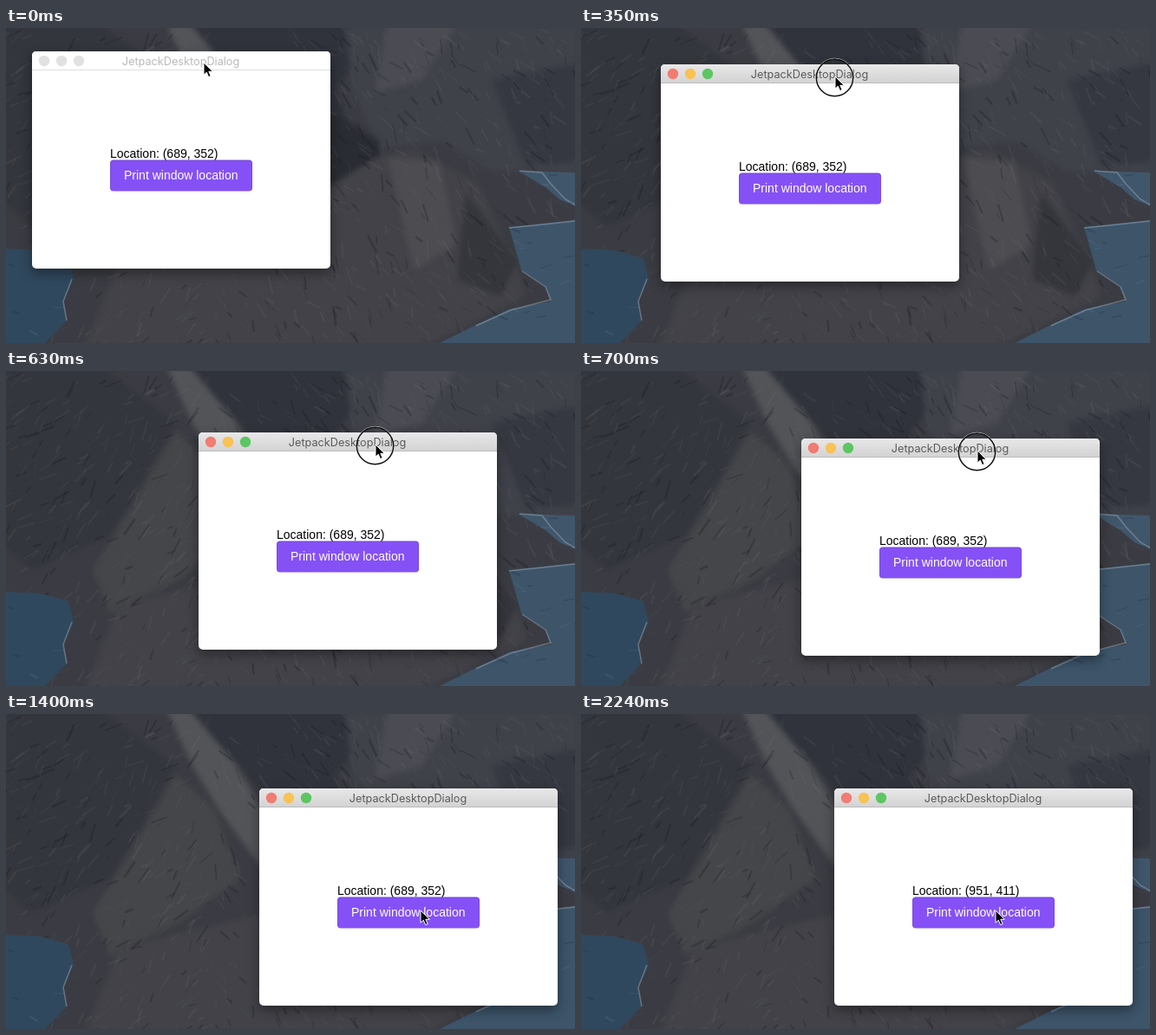
Write an HTML page with a canvas that moves like this. It is 656 by 364 pixels and loops after 2.31 s.

```html
<!DOCTYPE html>
<html lang="en">
<head>
<meta charset="utf-8">
<title>Window location</title>
<style>
  html, body { margin: 0; width: 100%; height: 100%; overflow: hidden; background: #3a3c43; }
  canvas, svg { position: absolute; left: 0; top: 0; width: 656px; height: 364px; }
  text { font: 14px "Liberation Sans", Arial, sans-serif; }
  #title { font: 12.7px Inter, Roboto, sans-serif; text-anchor: middle; fill: #5c5b5c; }
  #win { filter: drop-shadow(0 5px 7px rgba(0, 0, 0, .4)); }
  .idle .light { fill: #e1e1e1; }
  .idle #title { fill: #b9b9b9; }
  .idle #bar { fill: #fff; }
  .idle #rule { stroke: #dedede; }
</style>
</head>
<body>
<canvas id="scene" width="656" height="364"></canvas>
<svg viewBox="0 0 656 364">
  <defs>
    <linearGradient id="chrome" x2="0" y2="1">
      <stop stop-color="#e9e8e9"/>
      <stop offset="1" stop-color="#d3d2d3"/>
    </linearGradient>
  </defs>
  <g id="win">
    <rect width="344" height="251" rx="5" fill="#fff"/>
    <path id="bar" d="M0 22V5Q0 0 5 0H339Q344 0 344 5V22Z" fill="url(#chrome)"/>
    <path id="rule" d="M0 21.5H344" stroke="#bdbcbd"/>
    <circle class="light" cx="14" cy="11" r="6.2" fill="#f07c72"/>
    <circle class="light" cx="34" cy="11" r="6.2" fill="#f8c254"/>
    <circle class="light" cx="54" cy="11" r="6.2" fill="#5cc662"/>
    <text id="title" x="171.5" y="16">JetpackDesktopDialog</text>
    <text id="place" x="90" y="123"></text>
    <rect x="90" y="125.5" width="164" height="36" rx="4" fill="#6f43d0"/>
    <rect x="90.5" y="126.5" width="163" height="34.5" rx="3.5" fill="#8551f6"/>
    <rect id="ripple" x="90" y="125.5" width="164" height="36" rx="4" fill="#fff" opacity="0"/>
    <text x="106" y="148" fill="#fff">Print window location</text>
  </g>
  <g id="cursor">
    <g id="ring" fill="none">
      <circle cx="-.5" cy="1.5" r="22.3" stroke="#fff" stroke-opacity=".55"/>
      <circle cx="-.5" cy="1.5" r="21.2" stroke="#111" stroke-width="1.5"/>
    </g>
    <path d="M0 0V14.2L3.3 11.2L5.6 16.6L8.1 15.5L5.8 10.3H10.3Z" fill="#000" stroke="#fff" stroke-width="1"/>
  </g>
</svg>
<script>
const $ = id => document.getElementById(id);
const STEP = 70, LOOP = 2310;

// Coastline: flat shapes in the main tones, with light seeded texture
const ctx = $('scene').getContext('2d');
let seed = 11;
const rnd = () => (seed = seed * 16807 % 2147483647) / 2147483647;

const trace = points => new Path2D('M' + points.split(' ').join('L') + 'Z');
const shape = (color, points) => {
  ctx.fillStyle = color;
  ctx.fill(trace(points));
};

function streaks(count, spread, length, tilt, tones) {
  for (let i = 0; i < count; i++) {
    const x = rnd() * spread[0], y = rnd() * spread[1];
    const angle = tilt(x) + (rnd() - .5) * 1.1;
    const l = length * (.4 + rnd());
    ctx.strokeStyle = tones[i % tones.length];
    ctx.lineWidth = .6 + rnd() * 2;
    ctx.beginPath();
    ctx.moveTo(x, y);
    ctx.lineTo(x + l * Math.cos(angle), y + l * Math.sin(angle));
    ctx.stroke();
  }
}

function sea(points, color) {
  ctx.save();
  shape(color, points);
  ctx.clip(trace(points));
  streaks(260, [656, 364], 12, () => .1, ['rgba(120,145,165,.16)', 'rgba(20,35,52,.22)']);
  ctx.restore();
}

function foam(points) {
  ctx.strokeStyle = 'rgba(165,178,190,.45)';
  ctx.lineWidth = 1.5;
  ctx.stroke(new Path2D('M' + points.split(' ').join('L')));
}

function drawScene() {
  ctx.fillStyle = '#3b3c43';
  ctx.fillRect(0, 0, 656, 364);
  ctx.filter = 'blur(3px)';
  shape('#30333b', '190,-5 440,-5 380,70 410,150 330,140 270,60');
  shape('#34363d', '-5,-5 110,-5 195,60 120,190 30,230 -5,200');
  shape('#454649', '195,70 240,110 270,190 200,240 120,280 100,230 150,150');
  shape('#535458', '185,-5 212,-5 262,55 305,125 300,185 245,110 215,60');
  shape('#40424a', '390,-5 661,-5 661,170 560,165 500,130 430,140 400,70');
  shape('#4b4c53', '440,-5 520,-5 480,60 425,75');
  shape('#363841', '560,60 661,40 661,155 600,160');
  shape('#2a2c33', '370,95 430,130 440,190 370,200');
  shape('#424248', '425,150 470,140 545,180 592,285 600,310 480,369 90,369 130,270 300,230');
  shape('#4d4c51', '440,150 500,155 520,250 470,280');
  shape('#35353c', '530,190 590,270 570,310 520,290');
  ctx.filter = 'none';
  streaks(900, [656, 364], 16, x => x < 240 ? 2.3 : .95,
    ['rgba(125,126,130,.14)', 'rgba(16,18,24,.24)', 'rgba(95,97,104,.16)']);
  sea('0,255 40,257 72,266 78,290 66,316 70,338 45,364 0,364', '#30485d');
  sea('590,165 656,167 656,206 638,198 622,184', '#40566b');
  sea('580,230 656,222 656,364 500,364 540,344 580,325 628,316 622,298 594,280', '#3d5469');
  foam('592,165 618,167 628,180 645,198 656,204');
  foam('580,231 610,228 656,223');
  foam('595,281 622,299 628,314 582,326 542,344');
  foam('76,290 66,316 70,338');
}

// time, window x, window y, pointer x, pointer y
const track = [
  [0, 30, 27, 228, 40],
  [140, 30, 27, 228, 40],
  [210, 40, 30, 239, 43],
  [280, 63, 35, 263, 49],
  [350, 92, 42, 293, 56],
  [490, 153, 55, 355, 69],
  [630, 222, 71, 426, 85],
  [700, 254, 78, 457, 92],
  [770, 279, 83, 480, 96],
  [840, 292, 86, 490, 98],
  [980, 292, 86, 490, 98],
  [1050, 292, 86, 489, 110],
  [1260, 292, 86, 480, 215],
  [1330, 292, 86, 478, 227],
  [LOOP, 292, 86, 478, 227]
];

function pose(t) {
  const i = track.findIndex(row => row[0] > t);
  const a = track[i - 1], b = track[i];
  const k = (t - a[0]) / (b[0] - a[0]);
  return a.map((v, n) => Math.round(v + (b[n] - v) * k));
}

const between = (t, from, to) => t >= from && t < to;
const move = (id, x, y) => $(id).setAttribute('transform', `translate(${x} ${y})`);

function frame(now) {
  const t = Math.floor(now % LOOP / STEP) * STEP;
  const [, wx, wy, px, py] = pose(t);
  move('win', wx, wy);
  move('cursor', px, py);
  $('win').classList.toggle('idle', t < 140);
  $('ring').style.display = between(t, 140, 840) || between(t, 1680, 1820) ? '' : 'none';
  $('ripple').setAttribute('opacity', between(t, 1680, 1960) ? .12 : 0);
  $('place').textContent = `Location: (${t < 1820 ? '689, 352' : '951, 411'})`;
}

drawScene();
const start = performance.now();
(function tick() {
  frame(performance.now() - start);
  requestAnimationFrame(tick);
})();
</script>
</body>
</html>
```
